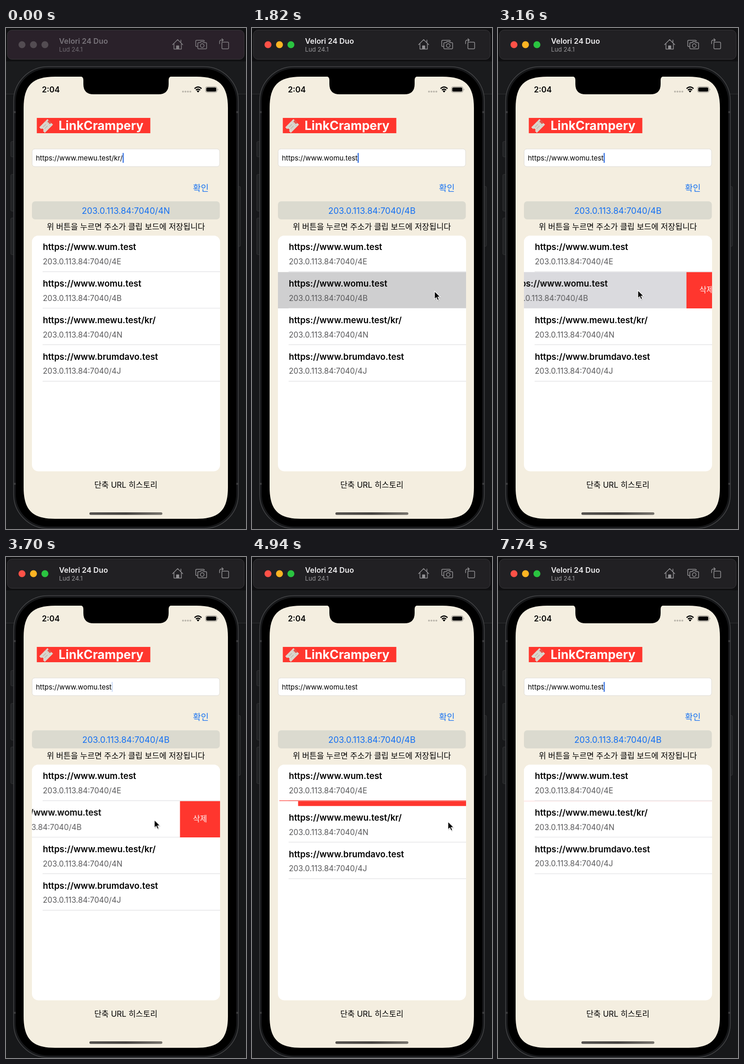
Recreate the animation shown at these times as an HTML page. Size 518x1081 px, loop 8180 ms.

```html
<!DOCTYPE html>
<html lang="ko">
<head>
<meta charset="utf-8">
<title>Link list</title>
<style>
  html, body { margin: 0; width: 100%; height: 100%; overflow: hidden; background: #17181a; }
  svg { display: block; width: 100vw; height: 100vh; font-family: Inter, "Noto Sans CJK KR", sans-serif; }
  text { white-space: pre; }
  .mid { text-anchor: middle; }
  .semi { font-weight: 600; }
  .blue { fill: #1470f2; }
  .url { font-size: 18.6px; font-weight: 600; }
  .short { font-size: 16.6px; fill: #59595b; }
  .field { font-size: 14.9px; }
  .after { opacity: 0; }
  .icons { fill: none; stroke: #929194; stroke-width: 1.5; stroke-linejoin: round; stroke-linecap: round; }
</style>
</head>
<body>
<svg viewBox="0 0 518 1081" preserveAspectRatio="none">
  <defs>
    <clipPath id="listClip"><rect x="56" y="448" width="406" height="508.5" rx="14"/></clipPath>
    <linearGradient id="homeBar"><stop stop-color="#55524e"/><stop offset=".5" stop-color="#45423f"/><stop offset="1" stop-color="#77736c"/></linearGradient>
  </defs>

  <!-- desktop behind the simulator -->
  <rect width="518" height="1081" fill="#17181a"/>
  <rect width="518" height="142" fill="#1a1b1d"/>
  <rect y="142" width="518" height="1" fill="#303133"/>
  <rect width="518" height="72" fill="#101012"/>

  <!-- window bar -->
  <rect id="bar" x="3" y="4.500" width="511" height="63" rx="10" fill="#212023" stroke="#38373a"/>
  <g id="lights">
    <circle cx="34.500" cy="36" r="7.500"/>
    <circle cx="59.300" cy="36" r="7.500"/>
    <circle cx="84" cy="36" r="7.500"/>
  </g>
  <text id="device" class="semi" x="114.500" y="33.500" font-size="16.200">Velori 24 Duo</text>
  <text id="system" x="114.500" y="50.500" font-size="13.200">Lud 24.1</text>
  <g id="icons" class="icons">
    <path d="M359.500 36 L370.500 25 L381.500 36 M362.500 34 V45.500 H378.500 V34 M377.500 31 V26"/>
    <path d="M368 45 V38.500 H373 V45 Z" fill="#929194"/>
    <path d="M413 40 H411.500 Q409.500 40 409.500 38 V28.500 Q409.500 26.500 411.500 26.500 H426 Q428 26.500 428 28.500"/>
    <path d="M416 31.500 H419 L420.500 29.500 H426 L427.500 31.500 H431 Q433 31.500 433 33.500 V43 Q433 45 431 45 H416 Q414 45 414 43 V33.500 Q414 31.500 416 31.500 Z"/>
    <circle cx="423.500" cy="38" r="4"/>
    <rect x="466" y="30.500" width="14.500" height="14.500" rx="2"/>
    <path d="M461 34 V30 Q461 26 465 26 H468.500 M466 23 L469 26 L466 29"/>
  </g>

  <!-- phone body -->
  <g fill="#202123" stroke="#343537">
    <rect x="10.500" y="245" width="8" height="33" rx="2"/>
    <rect x="10.500" y="316" width="8" height="79" rx="2"/>
    <rect x="10.500" y="410" width="8" height="79" rx="2"/>
    <rect x="499" y="342" width="7" height="129" rx="2"/>
  </g>
  <rect x="16.500" y="83.500" width="485" height="996.500" rx="74" fill="#161719" stroke="#454648" stroke-width="1.500"/>
  <path d="M17 181.500 h5 M496 181.500 h5 M17 983.500 h5 M496 983.500 h5" stroke="#3a3b3d" stroke-width="4"/>
  <rect x="21" y="88" width="476" height="987.500" rx="70"/>
  <path id="screen" fill="#f4eee0"/>
  <path d="M160 104.500 q7 0 7 8 v8.500 q0 22 22 22 h140 q22 0 22 -22 v-8.500 q0 -8 7 -8 z"/>

  <!-- status bar -->
  <text class="semi" x="77.500" y="139" font-size="17">2:04</text>
  <g fill="#bbb6ac">
    <circle cx="382" cy="137.300" r="2"/><circle cx="387.300" cy="137.300" r="2"/>
    <circle cx="392.600" cy="137.300" r="2"/><circle cx="397.900" cy="137.300" r="2"/>
  </g>
  <path d="M407 130.800 Q414.500 123.600 422 130.800 M410 134 Q414.500 129.800 419 134" fill="none" stroke="#000" stroke-width="2.500"/>
  <path d="M411.500 136 Q414.500 133.500 417.500 136 L414.500 139.200 Z"/>
  <rect x="430.500" y="126.500" width="25" height="12.500" rx="4" fill="none" stroke="#8f8b84"/>
  <rect x="432.200" y="128.200" width="21.600" height="9.100" rx="2.500"/>
  <path d="M457 130.500 q2 2.200 0 4.500 z" fill="#8f8b84"/>

  <!-- heading -->
  <rect x="66.500" y="194" width="245" height="33" fill="#ff362e"/>
  <g transform="translate(87 211) rotate(-45)">
    <path d="M-13 -8.500 H12 V-2.500 A3 3 0 0 0 12 3.500 V8.500 H-13 V3 A3 3 0 0 0 -13 -3 Z" fill="#dad7cd"/>
    <path d="M6 -8 V8" stroke="#b8b4aa" stroke-dasharray="2 2"/>
    <path d="M-7 -3 H2 M-7 2 H2" stroke="#c2beb4" stroke-width="2"/>
    <rect x="8" y="-5" width="5" height="8" fill="#e2574d"/>
  </g>
  <text x="113.500" y="220.300" font-size="26.500" font-weight="700" fill="#fff">LinkCrampery</text>

  <!-- form -->
  <rect x="56.500" y="261" width="404.500" height="38" rx="5.500" fill="#fff" stroke="#dddbd6"/>
  <text id="fieldBefore" class="field before" x="64.500" y="285.500">https://www.mewu.test/kr/</text>
  <text id="fieldAfter" class="field after" x="64.500" y="285.500">https://www.womu.test</text>
  <g id="caretPlace"><rect id="caret" y="269.500" width="2.400" height="21.500" rx="1" fill="#3470e0"/></g>
  <text class="mid blue" x="420.500" y="352" font-size="18.500">확인</text>
  <rect x="56" y="374" width="405.500" height="39" rx="7" fill="#dbdacf"/>
  <g class="mid blue" font-size="18.400">
    <text class="before" x="258.700" y="400.500">203.0.113.84:7040/4N</text>
    <text class="after" x="258.700" y="400.500">203.0.113.84:7040/4B</text>
  </g>
  <text class="mid" x="258.700" y="434.500" font-size="17">위 버튼을 누르면 주소가 클립 보드에 저장됩니다</text>

  <!-- history list -->
  <rect x="56" y="448" width="406" height="508.500" rx="14" fill="#fff"/>
  <g id="list" clip-path="url(#listClip)"></g>
  <text class="mid" x="258.700" y="991.500" font-size="17">단축 URL 히스토리</text>
  <rect x="180" y="1045" width="157.500" height="5.500" rx="2.750" fill="url(#homeBar)"/>

  <g id="cursor">
    <path d="M1 2 V19 L5 15 L7.500 21 L10.500 20 L8 14 H13.500 Z" fill="#000" opacity=".25"/>
    <path d="M0 0 V17 L4 13.400 L6.600 19.500 L9.600 18.300 L7 12.300 H12.300 Z" stroke="#fff" stroke-width="1.200"/>
  </g>
</svg>

<script>
const LOOP = 8180, ROW = 78.8, LIST_TOP = 447.6, LIST_RIGHT = 462;
const $ = id => document.getElementById(id);

// Rectangle whose corners ease into the straight sides.
function smoothRect(left, top, right, bottom, radius) {
  const reach = 1.28 * radius, pull = 0.355 * radius;
  return `M${left + reach} ${top} H${right - reach}
    C${right - pull} ${top} ${right} ${top + pull} ${right} ${top + reach} V${bottom - reach}
    C${right} ${bottom - pull} ${right - pull} ${bottom} ${right - reach} ${bottom} H${left + reach}
    C${left + pull} ${bottom} ${left} ${bottom - pull} ${left} ${bottom - reach} V${top + reach}
    C${left} ${top + pull} ${left + pull} ${top} ${left + reach} ${top} Z`;
}
$('screen').setAttribute('d', smoothRect(38, 105, 479, 1059, 53));

// Stops are [ms, style, easing]; the last style holds to the end of the loop.
function play(el, stops, easing = 'linear') {
  const held = [...stops, [LOOP, stops[stops.length - 1][1]]];
  if (held[0][0] > 0) held.unshift([0, held[0][1]]);
  el.animate(
    held.map(([ms, style, ease]) => ({ offset: ms / LOOP, easing: ease || easing, ...style })),
    { duration: LOOP, iterations: Infinity, fill: 'both' });
}
const swap = (el, prop, from, to, ms) => play(el, [[0, { [prop]: from }], [ms, { [prop]: to }]], 'step-end');
const move = (x, y) => ({ transform: `translate(${x}px, ${y}px)` });

// List rows; the second one slides, so it is drawn below the others.
const separator = `<rect x="79" y="${ROW - 1.2}" width="383" height="1.2" fill="#dfdfe1"/>`;
const row = (index, url, code) => `
  <g transform="translate(0 ${LIST_TOP + ROW * index})"><g id="row${index}">
    <rect id="cell${index}" x="56" width="406" height="${ROW}" fill="#fff"/>
    <text class="url" x="79.5" y="31.6">https://www.${url}</text>
    <text class="short" x="79.5" y="62.4">203.0.113.84:7040/${code}</text>
    ${separator}
  </g></g>`;
const deleteButton = `
  <rect x="${LIST_RIGHT}" width="410" height="${ROW}" fill="#ff362e"/>
  <text x="${LIST_RIGHT + 28}" y="45" font-size="16.5" fill="#fff">삭제</text>`;
$('list').innerHTML =
  row(1, 'womu.test', '4B') +
  row(0, 'wum.test', '4E') +
  row(2, 'mewu.test/kr/', '4N') +
  row(3, 'brumdavo.test', '4J') +
  '<rect id="seam" x="59" y="525.2" width="403" height="1.2"/>';
$('row1').insertAdjacentHTML('beforeend', deleteButton);

// Window becomes active and the tapped address fills the form.
const TAP = 1700;
swap($('bar'), 'fill', '#2a212a', '#212023', TAP);
swap($('device'), 'fill', '#78737a', '#f0eff1', TAP);
swap($('system'), 'fill', '#706b72', '#98979a', TAP);
swap($('icons'), 'opacity', 0.85, 1, TAP);
['#ff5147', '#fdb423', '#2ac440'].forEach((color, i) =>
  swap($('lights').children[i], 'fill', '#534c52', color, TAP));
document.querySelectorAll('.before').forEach(el => swap(el, 'opacity', 1, 0, TAP));
document.querySelectorAll('.after').forEach(el => swap(el, 'opacity', 0, 1, TAP));

// Caret follows the text and blinks softly.
const caretX = el => move(64.5 + el.getComputedTextLength(), 0);
play($('caretPlace'), [[0, caretX($('fieldBefore'))], [TAP, caretX($('fieldAfter'))]], 'step-end');
const blink = [[0, { opacity: 1 }]];
for (let start = 10; start < LOOP - 600; start += 1190) {
  blink.push([start, { opacity: 1 }], [start + 160, { opacity: 0 }],
    [start + 440, { opacity: 0 }], [start + 590, { opacity: 1 }]);
}
play($('caret'), blink);

// Swipe, then delete: the cell leaves to the left while lower rows close the gap.
const DELETE = 4690, CLOSED = 5130;
play($('row1'), [
  [2800, move(0, 0)], [3160, move(-55, 0), 'ease-out'], [3360, move(-86.5, 0)],
  [DELETE, move(-86.5, 0), 'ease'], [CLOSED, move(-406, 0)]
]);
for (const id of ['row2', 'row3']) {
  play($(id), [[DELETE, move(0, 0), 'ease'], [CLOSED, move(0, -ROW)]]);
}
play($('cell1'), [
  [0, { fill: '#fff' }, 'step-end'], [1680, { fill: '#cfcfd0' }, 'step-end'],
  [2780, { fill: '#dadade' }], [3200, { fill: '#dadade' }], [3360, { fill: '#fff' }]
]);
play($('seam'), [
  [0, { fill: '#ff362e', opacity: 0 }], [DELETE, { fill: '#ff362e', opacity: 1 }],
  [CLOSED, { fill: '#eadada', opacity: 1 }], [5960, { fill: '#eadada', opacity: 0 }]
], 'step-end');

const glide = 'ease-in-out';
play($('cursor'), [
  [0, move(-16, 700)], [20, move(-14, 700)], [820, move(260, 640)], [1620, move(394, 568)],
  [2500, move(394, 568)], [2600, move(368, 567)], [2780, move(368, 567)],
  [3160, move(302, 566)], [3200, move(298, 566)], [3500, move(298, 566), glide],
  [4160, move(413, 573)], [4400, move(413, 573)], [4700, move(423, 571)],
  [5140, move(423, 571), 'ease-in'], [5560, move(285, 873), 'ease-out'], [5860, move(262, 945)]
]);
swap($('cursor'), 'opacity', 1, 0, 5960);
</script>
</body>
</html>
```
